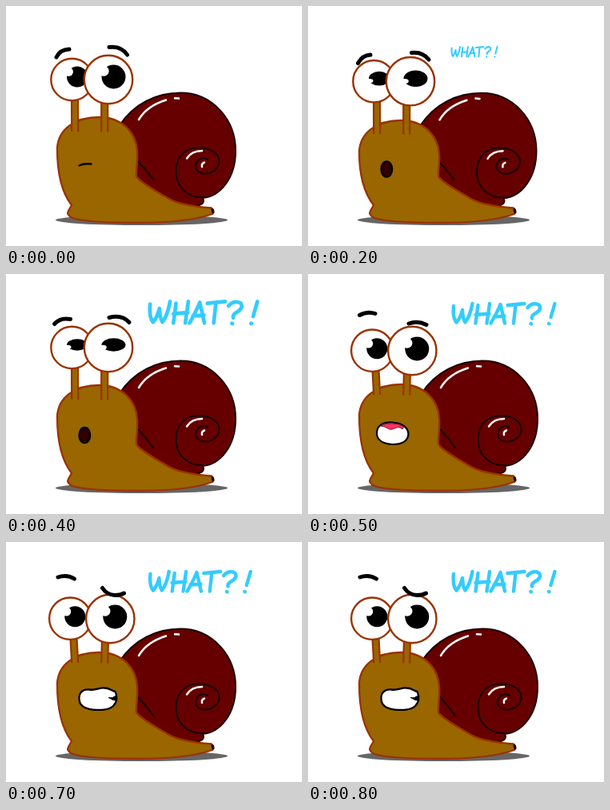
Write an HTML page that moves like this. It is 370 px wide and 300 px high and loops after 1000 ms.

```html
<!DOCTYPE html>
<html lang="en">
<head>
<meta charset="utf-8">
<title>Surprised snail</title>
<style>
html, body { margin: 0; width: 100%; height: 100%; overflow: hidden; background: #fff; }
svg { display: block; width: 100vw; height: 100vh; }
</style>
</head>
<body>
<svg id="stage" viewBox="0 0 370 300" role="img" aria-label="WHAT?!"></svg>
<script>
const LOOP = 1000;
const SKIN = '#996600', EDGE = '#993300', SHELL = '#660000', DARK = '#180000', SKY = '#33ccff';

const line = (d, color, width, cap = 'round') =>
  `<path d="${d}" fill="none" stroke="${color}" stroke-width="${width}" stroke-linecap="${cap}" stroke-linejoin="round"/>`;
const shape = (d, fill, color, width) =>
  `<path d="${d}" fill="${fill}" stroke="${color}" stroke-width="${width}" stroke-linejoin="round"/>`;
const oval = (x, y, rx, ry, fill, color = 'none', width = 0) =>
  `<ellipse cx="${x}" cy="${y}" rx="${rx}" ry="${ry}" fill="${fill}" stroke="${color}" stroke-width="${width}"/>`;

const smallO = y => oval(98.3, y, 6.8, 9.6, '#330000', '#000', 2.4);

const mouths = {
  flat: line('M91.5 199.5Q97 196.5 106.5 197.5', '#000', 2.4),
  o: smallO(201.5),
  oMid: smallO(204),
  oLow: smallO(206),
  open: shape('M86 199C86 189 94 185 105 185.5C118 186 125 192 125.5 200C125 209 117 213 105 213C93 212 86 207 86 199Z', '#fff', '#000', 2.2) +
    shape('M91 190Q104 183 120 191L118 194Q114 190 108 193Q103 196 98 192Q94 190 91 190Z', '#ff3366', '#660000', .8),
  teeth: shape('M91.5 196C91 188 96 184 104 184.5C113 186 115 182 123 182.5C130 182.5 131 186 136.5 187C139.5 193 139 200 134 205C128 211 116 210 108 209.5C97 208 91.5 204 91.5 196Z', '#fff', '#000', 2.3) +
    shape('M128 194.5Q133 196 138 191.5L138 198Q134 198.5 131 196Z', '#000', '#000', .8)
};

const brows = {
  calm: ['M63 64Q67.5 54.5 79 54', 'M129 51.5Q144 49.5 151.5 61'],
  low: ['M62.5 71.5Q68 61.5 78 61', 'M129.5 58.5Q143 57 151 67'],
  lower: ['M62.5 75Q68 65 78.5 64.5', 'M129 61Q143 59.5 151.5 70'],
  wide: ['M60.5 62.5Q68 54 80.5 56.5', 'M129 54.5Q145 50.5 154 60.5'],
  raised: ['M64.5 51.5Q74 46 84 49.5', 'M126 62Q137 58 148 63.5'],
  doubt: ['M65 44Q76 40 85.5 46', 'M120.5 57.5Q126 66 136 66.5Q143 66.5 147.5 64']
};

const calmEyes = { left: [82.5, 92], right: [128, 92] };
const drop = n => ({ left: [82.5, 92 + n], right: [128, 92 + n] });
const wideEyes = { left: [80.3, 95.7], right: [130.3, 96] };
const alert = { top: 138, foot: 151, eyes: wideEyes, lean: 2, look: [6, -2.5], open: 1, shell: [0, 0] };

// Each pose lasts from its start time until the next one.
const poses = [
  { at: 0, top: 139, foot: 157, eyes: calmEyes, lean: 0, look: [6.5, -3.5], open: 1, brow: 'calm', mouth: 'flat', shell: [0, 0] },
  { at: 200, top: 143, foot: 160, eyes: drop(2.2), lean: 0, look: [6.5, -3.5], open: .68, brow: 'low', mouth: 'oMid', shell: [-1.5, .3], word: [178.5, .45, .5] },
  { at: 300, top: 146, foot: 161, eyes: drop(4.5), lean: 0, look: [7.5, -3], open: 0, brow: 'lower', mouth: 'oLow', shell: [-.7, 1], word: [179, .7, .73] },
  { at: 400, top: 139, foot: 157, eyes: calmEyes, lean: 0, look: [6.5, -3.5], open: .55, brow: 'wide', mouth: 'o', shell: [0, 0], word: [177.5, 1.06, 1.09] },
  { ...alert, at: 500, brow: 'raised', mouth: 'open', word: [179.5, 1, 1] },
  { ...alert, at: 600, brow: 'raised', mouth: 'open', word: [179.5, 1, 1] },
  { ...alert, at: 700, brow: 'doubt', mouth: 'teeth', word: [178, .99, 1] },
  { ...alert, at: 800, brow: 'doubt', mouth: 'teeth', word: [179.5, 1, 1] }
];

const letters = [
  'M2.5 -25Q1 -10 6 -4.5Q11 -10 13.5 -20Q14 -9 17 -4.5Q23 -12 26 -28',
  'M33 -26L30 -3.5M47.5 -28L44 -3.5M30 -14L47 -15.5',
  'M49 -3.5Q57 -17 61 -27Q64 -15 66.5 -3.5M53 -11.5L66 -12.5',
  'M70 -26L91 -28M80 -26L77.5 -3.5',
  'M95 -23Q101 -30 109 -26.5Q113.5 -21 105 -16Q99.5 -13 100.5 -9.5M99 -3l.5 .3',
  'M129 -28L124 -11M121.5 -3l.5 .2'
].join('');

const word = ([x, sx, sy]) =>
  `<g transform="translate(${x} 65) scale(${sx} ${sy})">${line(letters, SKY, 4.4)}</g>`;

function shell([dx, dy]) {
  return `<g transform="translate(${dx} ${dy})">` +
    shape('M142 149C160 122 188 108.5 218 108.5C258 108.5 287 142 287 181C287 215 268 238 246 240Q250 248 237 250L205 250L150 235Z', SHELL, DARK, 2) +
    line('M247 239C227 240 212 226 212.5 206C213 187 225 177 241 177C258 177.5 267 186 266.5 195C266 204 256 210 247 209.5C239 208 235 202 238 196C241 190 248 189 252 192', DARK, 2) +
    line('M165 194Q175 204 184 217', DARK, 2) +
    line('M166 142Q176 125 200 117.5M211 115.3L216 115.6M226 190.5Q232 181 245 181M245 201Q244 197 248 195.5', '#fff', 2.5) +
    '</g>';
}

function body(top) {
  const side = top + 39;
  return shape(`M64 ${side}C65 ${top + 16} 85 ${top} 116 ${top}C146 ${top} 163 ${top + 20} 164 ${side + 4}` +
    'C165 196 162 206 163 213C166 219 185 230 202 240C215 248 236 251 257 252.5Q261 256 258 260' +
    `C235 268 200 271 165 271C130 271 95 269 83 265Q75 261 78 256L82 249C68 231 64 206 64 ${side}Z`, SKIN, EDGE, 2.3) +
    line('M258 254.5L259 258', DARK, 3);
}

function stalk(x, foot, topX) {
  const d = `M${topX - 4} 112L${x - 4} ${foot}L${x + 4} ${foot}L${topX + 4} 112`;
  return `<path d="${d}" fill="${SKIN}"/>` +
    line(`M${topX - 4} 112L${x - 4} ${foot}M${topX + 4} 112L${x + 4} ${foot}`, EDGE, 2.2, 'butt');
}

function pupil(x, y, r, open) {
  if (!open) return line(`M${x - r * .85} ${y}H${x + r * .8}`, '#222', 1.2);
  const glint = open === 1 ? [-.82, -.48, .43, .43] : [-.9, .22, .32, .2];
  const [gx, gy, rx, ry] = glint.map(v => v * r);
  return oval(x, y, r, r * open, '#000') + oval(x + gx, y + gy, rx, ry, '#fff');
}

const eye = ([x, y], r, size, { look, open }) =>
  oval(x, y, r, r, '#fff', EDGE, 2.4) + pupil(x + look[0], y + look[1], size, open);

function draw(p) {
  return oval(169.5, 267.6, 107.5, 6.4, '#666') +
    shell(p.shell) + body(p.top) +
    stalk(86.2, p.foot, 86 - p.lean) + stalk(123.2, p.foot + .5, 123.2 + p.lean / 2) +
    eye(p.eyes.left, 26.2, 13, p) + eye(p.eyes.right, 30.2, 15, p) +
    brows[p.brow].map(d => line(d, '#000', 5)).join('') +
    mouths[p.mouth] + (p.word ? word(p.word) : '');
}

const stage = document.getElementById('stage');
stage.innerHTML = poses.map(p => `<g display="none">${draw(p)}</g>`).join('');
const layers = [...stage.children];

function show(time) {
  const t = time % LOOP;
  const current = poses.filter(p => p.at <= t).length - 1;
  layers.forEach((layer, i) => layer.setAttribute('display', i === current ? 'inline' : 'none'));
}

const start = performance.now();
function tick(now) {
  show(Math.max(0, now - start));
  requestAnimationFrame(tick);
}
show(0);
requestAnimationFrame(tick);
</script>
</body>
</html>
```
